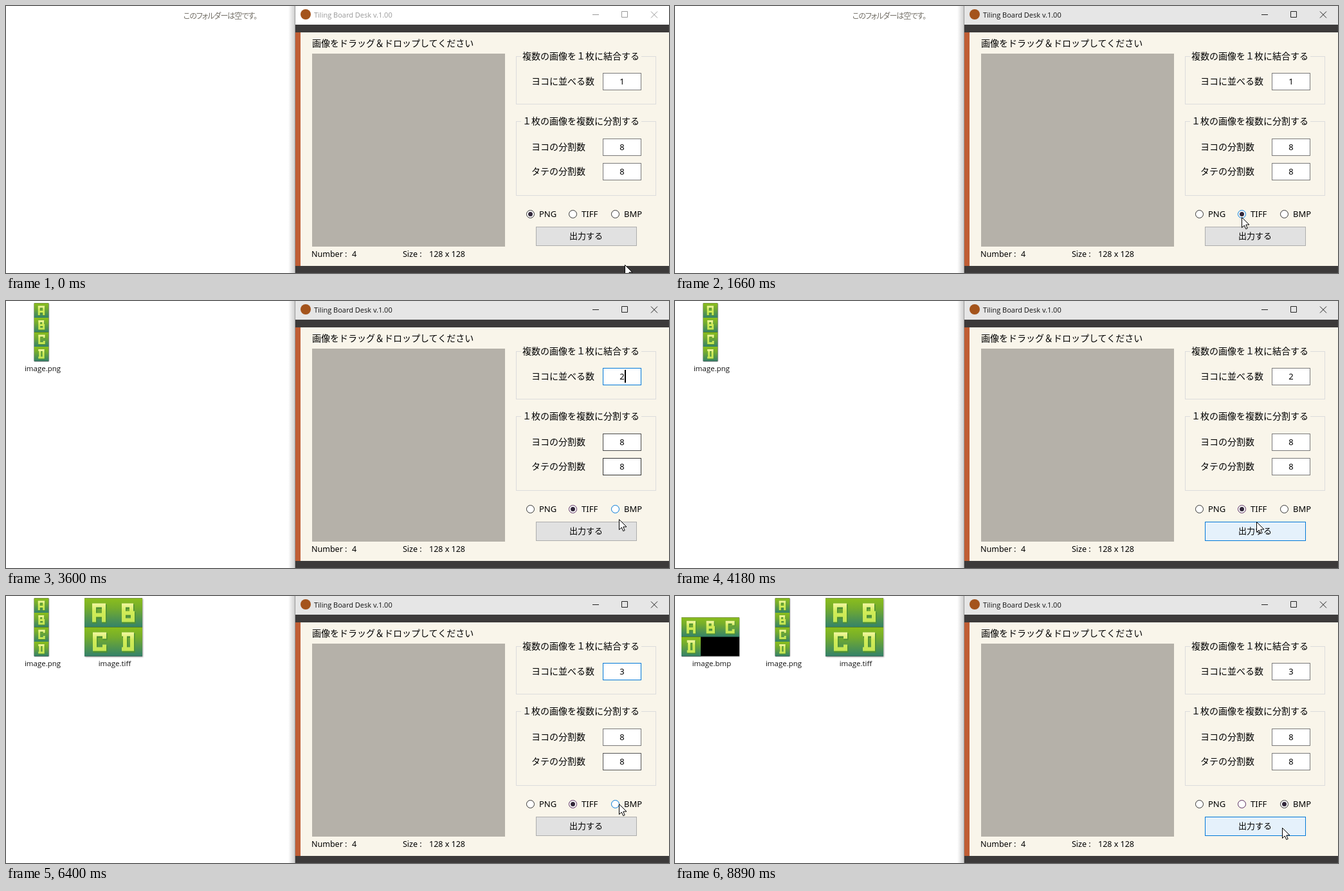
These frames come from a looping animation (1031x415 px, 8910 ms). An HTML page:

```html
<!DOCTYPE html>
<html lang="ja">
<head>
<meta charset="utf-8">
<title>Tiling Board Desk</title>
<style>
html, body { margin: 0; width: 100%; height: 100%; overflow: hidden; background: #fff; }
svg { display: block; width: 1031px; height: 415px; }
text { font: 14px "Noto Sans CJK JP", "Noto Sans CJK", sans-serif; fill: #000; }
.latin { font: 13px "Noto Sans", sans-serif; }
.small { font-size: 12.5px; }
.file { font: 11.5px "Open Sans", sans-serif; fill: #111; }
.caption { font: 11px "Open Sans", sans-serif; }
.empty { font-size: 12px; letter-spacing: -1px; font-feature-settings: "palt"; fill: #747068; }
.mid { text-anchor: middle; }
.crisp { shape-rendering: crispEdges; }
.thumb { filter: drop-shadow(1px 1px 1px #0006); }
</style>
</head>
<body>
<svg viewBox="0 0 1031 415">
  <defs>
    <linearGradient id="grass" x2="0" y2="1">
      <stop stop-color="#8bbe1c"/><stop offset=".35" stop-color="#74ac2d"/><stop offset="1" stop-color="#34826a"/>
    </linearGradient>
    <linearGradient id="lime" gradientUnits="userSpaceOnUse" x1="0" y1="8" x2="0" y2="38">
      <stop stop-color="#f3f7a4"/><stop offset=".4" stop-color="#d2ec58"/><stop offset="1" stop-color="#c3e654"/>
    </linearGradient>
    <linearGradient id="shade"><stop stop-color="#fff"/><stop offset="1" stop-color="#cfcfcf"/></linearGradient>
  </defs>

  <g id="folder"></g>
  <text id="empty" class="empty mid" x="333" y="20">このフォルダーは空です。</text>

  <g class="crisp">
    <rect x="439" width="10" height="415" fill="url(#shade)"/>
    <rect x="449" width="1" height="415" fill="#9a9a9a"/>
    <rect id="bar" x="450" width="581" height="29"/>
    <rect x="450" y="29" width="581" height="386" fill="#3c3a3a"/>
    <rect x="450" y="41" width="581" height="363" fill="#f9f5ea"/>
    <rect x="450" y="41" width="8" height="363" fill="#c05e35"/>
    <rect x="476" y="74" width="300" height="300" fill="#b5b1a9"/>
  </g>
  <circle cx="466" cy="13" r="8" fill="#a4541c"/>
  <text id="caption" class="caption" x="479" y="17.5">Tiling Board Desk v.1.00</text>
  <path id="controls" fill="none" d="M912 13.5h10M957.5 8.5h9v9h-9zM1003 8.5l10 10M1013 8.5l-10 10"/>

  <text x="476" y="63">画像をドラッグ＆ドロップしてください</text>
  <g class="crisp" fill="none" stroke="#dcdcdc">
    <path d="M801 78.5H793.5V152.5H1010.5V78.5H988M801 179.5H793.5V294.5H1010.5V179.5H988"/>
  </g>
  <text x="803" y="83">複数の画像を１枚に結合する</text>
  <text x="803" y="184">１枚の画像を複数に分割する</text>
  <text x="817" y="122">ヨコに並べる数</text>
  <text x="817" y="224">ヨコの分割数</text>
  <text x="817" y="262">タテの分割数</text>

  <g id="fields"></g>
  <g id="radios"></g>
  <rect id="button" class="crisp" x="824.5" y="343.5" width="156" height="29"/>
  <text class="mid" x="902" y="362" style="font-size:13px">出力する</text>

  <text class="latin small" x="475" y="390">Number :</text>
  <text class="latin small" x="538" y="390">4</text>
  <text class="latin small" x="617" y="390">Size :</text>
  <text class="latin small" x="658" y="390">128 x 128</text>

  <path id="arrow" d="M.5 .5V16.5L4.3 13L6.8 18.6L9.2 17.5L6.8 12H12Z" fill="#fff" stroke="#000"/>
  <path id="beam" d="M-4.5-8.5H4.5V-6.5H1.5V6.5H4.5V8.5H-4.5V6.5H-1.5V-6.5H-4.5Z" fill="#d6d6d6" stroke="#555"/>
</svg>

<script>
const LOOP = 8910;
const $ = id => document.getElementById(id);
const set = (el, attrs) => { for (const k in attrs) el.setAttribute(k, attrs[k]); };
const show = (el, on) => set(el, { visibility: on ? 'visible' : 'hidden' });
const within = (t, spans) => spans.some(([a, b]) => t >= a && t < b);

// Pointer stops: time, x, y
const path = [
  [0, 962, 402], [30, 962, 402], [380, 883, 353], [930, 883, 353],
  [1470, 881, 328], [1680, 881, 328], [2280, 954, 119], [2530, 972, 117],
  [2600, 972, 117], [2780, 950, 117], [2980, 950, 117], [3600, 953, 339],
  [3820, 900, 356], [4080, 900, 356], [4790, 970, 116], [5000, 970, 116],
  [5720, 986, 232], [5790, 986, 232], [6400, 953, 323], [6490, 953, 323],
  [6650, 945, 362], [6850, 945, 362], [7100, 943, 356], [8889, 943, 356],
  [8890, 944, 360], [LOOP, 944, 360]
];
const png = 1960, tiff = 5300, bmp = 8170;
const pressed = [[830, 930], [3950, 4050], [6750, 6850]];
const focused = [[2600, 3950], [4860, 6750]];
const selected = [[2700, 2950], [4860, 5760]];

const buttonBox = [824, 343, 157, 30];
const fieldBoxes = [104, 206, 244].map(y => [928, y, 60, 27]);
const radioX = [815.5, 881.5, 947.5];

const letters = {
  A: 'M15 37V11H30V37M15 26H30',
  B: 'M28 23V11H16V34H30V23H16',
  C: 'M31 18V11H16V34H31V27',
  D: 'M13 11H29V34H13M18 11V34'
};

function thumb(name, cols, scale) {
  const rows = cols === 1 ? 4 : 2, w = cols * 45, h = rows * 45;
  const tiles = Object.keys(letters).map((c, i) => `
    <g transform="translate(${i % cols * 45} ${Math.floor(i / cols) * 45})">
      <rect width="45" height="45" fill="url(#grass)"/>
      <path d="${letters[c]}" transform="translate(1 2)" fill="none" stroke="#4c8f35" stroke-width="7"/>
      <path d="${letters[c]}" fill="none" stroke="url(#lime)" stroke-width="6"/>
    </g>`).join('');
  return `<g id="${name}">
    <g class="thumb" transform="translate(${55 - w * scale / 2} ${93.5 - h * scale}) scale(${scale})">
      <rect width="${w}" height="${h}"/>${tiles}
    </g>
    <text class="file mid" x="57" y="109">image.${name}</text>
  </g>`;
}

$('folder').innerHTML = thumb('bmp', 3, 2 / 3) + thumb('png', 1, .5) + thumb('tiff', 2, 1);
$('fields').innerHTML = fieldBoxes.map(([x, y, w, h], i) => `
  <rect class="crisp" id="field${i}" x="${x + .5}" y="${y + .5}" width="${w - 1}" height="${h - 1}" fill="#fff"/>
  ${i ? '' : '<rect id="mark" x="954" y="107" width="9" height="20" fill="#2a8be6"/>'}
  <text class="latin mid" id="value${i}" x="958" y="${y + 17.5}">8</text>`).join('') +
  '<rect id="caret" x="962" y="107" width="2" height="20"/>';
$('radios').innerHTML = ['PNG', 'TIFF', 'BMP'].map((name, i) => `
  <circle id="ring${i}" cx="${radioX[i]}" cy="323.5" r="6" fill="#fff"/>
  <circle id="dot${i}" cx="${radioX[i]}" cy="323.5" r="3.5" fill="#33283a"/>
  <text class="latin" x="${radioX[i] + 13.5}" y="328">${name}</text>`).join('');

function pointer(t) {
  t = Math.max(0, t);
  const i = Math.max(1, path.findIndex(p => p[0] > t));
  const [t0, x0, y0] = path[i - 1], [t1, x1, y1] = path[i];
  const u = (t - t0) / (t1 - t0), e = u * u * (3 - 2 * u);
  return [Math.round(x0 + (x1 - x0) * e), Math.round(y0 + (y1 - y0) * e)];
}

const inside = ([px, py], [x, y, w, h]) => px >= x && px < x + w && py >= y && py < y + h;

// Hover strength, fading after the pointer has left
function glow(box, t) {
  for (let k = 0; k < 10; k++)
    if (inside(pointer(t - 80 - k * 40), box)) return Math.min(1, 1.2 - k * .12);
  return 0;
}

const mix = (a, b, u) => `rgb(${a.map((v, i) => Math.round(v + (b[i] - v) * u))})`;

function draw(t) {
  const pos = pointer(t), active = t >= 830;
  set($('bar'), { fill: active ? '#e6e6e6' : '#fff' });
  set($('caption'), { style: `fill:${active ? '#111' : '#999'}` });
  set($('controls'), { stroke: active ? '#222' : '#999' });

  show($('empty'), t < png);
  const shift = t >= bmp ? 1 : 0;
  [['bmp', bmp, 0], ['png', png, shift], ['tiff', tiff, 1 + shift]].forEach(([id, from, slot]) => {
    show($(id), t >= from);
    set($(id), { transform: `translate(${slot * 112} 0)` });
  });

  const focus = focused.find(span => within(t, [span]));
  const sel = within(t, selected);
  fieldBoxes.forEach((box, i) => set($('field' + i), {
    stroke: !i && focus ? '#0078d7' : mix([122, 122, 122], [23, 23, 23], glow(box, t))
  }));
  $('value0').textContent = t < 2950 ? 1 : t < 5760 ? 2 : 3;
  set($('value0'), { style: `fill:${sel ? '#fff' : '#000'}` });
  show($('mark'), sel);
  show($('caret'), focus && Math.floor((t - focus[0]) / 480) % 2 === 0);

  const choice = t < 1660 ? 0 : t < 6480 ? 1 : 2;
  radioX.forEach((x, i) => {
    const base = i === 1 && t >= 1660 ? [84, 40, 92] : [51, 51, 51];
    set($('ring' + i), { stroke: mix(base, [0, 120, 215], glow([x - 7, 315, 49, 19], t)) });
    show($('dot' + i), i === choice);
  });

  const hover = glow(buttonBox, t), down = within(t, pressed);
  set($('button'), {
    fill: down ? '#cce4f7' : mix([225, 225, 225], [229, 241, 251], hover),
    stroke: down ? '#005499' : mix([173, 173, 173], [0, 120, 215], hover)
  });

  const typing = fieldBoxes.some(box => inside(pos, box));
  show($('arrow'), !typing);
  show($('beam'), typing);
  set($(typing ? 'beam' : 'arrow'), { transform: `translate(${pos})` });
}

let start;
function tick(now) {
  start ??= now;
  draw((now - start) % LOOP);
  requestAnimationFrame(tick);
}
draw(0);
requestAnimationFrame(tick);
</script>
</body>
</html>
```
